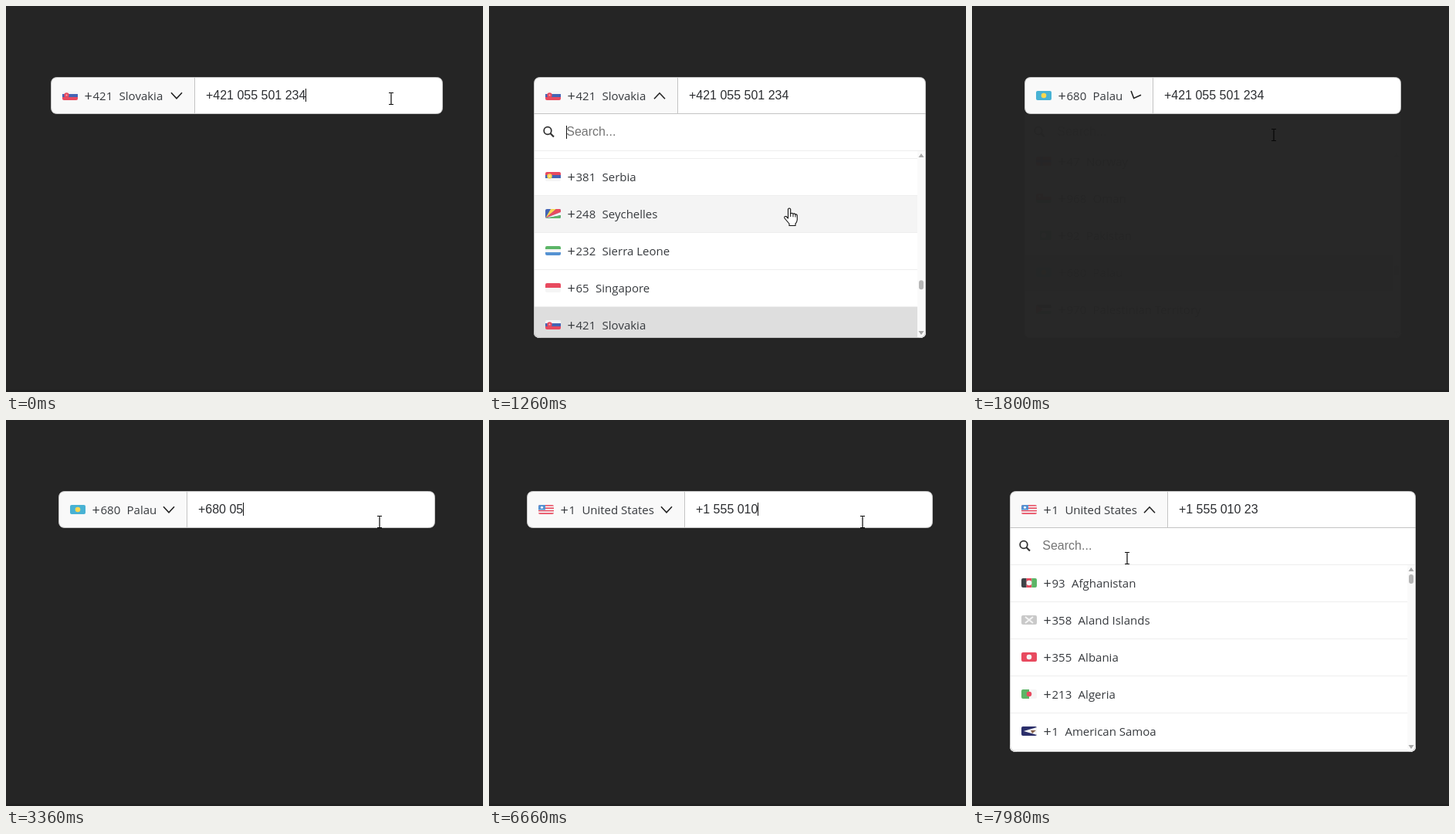
Animation, 618 px wide and 500 px high, one loop 8 s. Source, as an HTML page:

```html
<!DOCTYPE html>
<html lang="en">
<head>
<meta charset="utf-8">
<title>Phone input</title>
<style>
  html, body { margin: 0; width: 100%; height: 100%; overflow: hidden; background: #252525; }
  svg { display: block; width: 618px; height: 500px; }
  .label { font: 15px "Open Sans", "Noto Sans", sans-serif; fill: #373a3e; }
  .plus { font-size: 18px; }
  .input { font: 16px "Liberation Sans", Arial, sans-serif; fill: #2c2e31; }
</style>
</head>
<body>
<svg id="stage" viewBox="0 0 618 500"></svg>
<script>
const LOOP = 8000, STEP = 60, ROW = 48, TOP = 188, BOTTOM = 430, FLAG_H = 12;
const TOTAL_ROWS = 240, SECOND_BASE = 157;
const stage = document.getElementById('stage');

const palette = { r: '#e84a5f', w: '#f5f5f5', b: '#4464b4', g: '#5cb567', y: '#fbd850', c: '#48b2d4', d: '#5592d2',
                  k: '#3e4347', n: '#2b2f6b', o: '#f0924a', s: '#c9c9c9', m: '#8b3450' };

// Flag specs: stripe direction and colours, then emblems (+ canton, * disc, @ left disc, < or > wedge, x cross, / fan).
const parse = (text, base) => text.trim().split('\n').map((line, i) => {
  const [code, name, flag] = line.trim().split('|');
  return { code, name, flag, index: base + i };
});

const firstRows = parse(`93|Afghanistan|vkrg *w
  358|Aland Islands|hs xw
  355|Albania|hr *w
  213|Algeria|vgw *r
  1|American Samoa|hn >w
  376|Andorra|vbyr *o
  244|Angola|hrk *y
  1|Anguilla|hn +r
  1|Antigua and Barbuda|hkcr *y
  54|Argentina|hcwc *y`, 0);

const laterRows = parse(`47|Norway|hr xb
  968|Oman|hwrg +r
  92|Pakistan|vwggg *w
  680|Palau|hc *y
  970|Palestinian Territory|hkwg <r
  507|Panama|hwr +b
  675|Papua New Guinea|hrk *y
  595|Paraguay|hrwb *y
  51|Peru|vrwr
  63|Philippines|hbr <w
  48|Poland|hwr
  351|Portugal|vgrr @y
  1|Puerto Rico|hrwrwr <b
  974|Qatar|vwmm
  262|Reunion|vbwr
  40|Romania|vbyr
  7|Russia|hwbr
  250|Rwanda|hccyg
  685|Samoa|hr +b
  378|San Marino|hwc *y
  966|Saudi Arabia|hg *w
  221|Senegal|vgyr *g
  381|Serbia|hrbw @y
  248|Seychelles|hb /
  232|Sierra Leone|hgwd
  65|Singapore|hrw
  421|Slovakia|hwbr @r
  386|Slovenia|hwbr @b
  677|Solomon Islands|hbg
  252|Somalia|hc *w
  27|South Africa|hrgb <k`, SECOND_BASE);

const find = name => laterRows.find(r => r.name === name);
const slovakia = { ...find('Slovakia'), width: 186 };
const palau = { ...find('Palau'), width: 166 };
const unitedStates = { code: '1', name: 'United States', flag: 'hrwrwrwr +d', width: 204 };

const clamp = v => Math.max(0, Math.min(1, v));
const ramp = (t, a, b) => clamp((t - a) / (b - a));
const ease = p => p * p * (3 - 2 * p);

// Keys are [time, ...values].
function track(keys, t) {
  const i = keys.findIndex(k => k[0] > t);
  if (i < 1) return (i ? keys[keys.length - 1] : keys[0]).slice(1);
  const a = keys[i - 1], b = keys[i], p = ease(ramp(t, a[0], b[0]));
  return a.slice(1).map((v, n) => v + (b[n + 1] - v) * p);
}
const latest = (keys, t) => keys.filter(k => k[0] <= t).pop();

const mouseKeys = [[120, 499, 120], [480, 222, 122], [600, 222, 122], [960, 389, 262], [1260, 389, 262],
  [1500, 391, 310], [1620, 391, 345], [1800, 391, 167], [2340, 484, 132], [7260, 484, 132],
  [7500, 182, 138], [7600, 184, 142], [7980, 201, 179]];

const slovakiaTop = slovakia.index * ROW;
const scrollKeys = [[900, slovakiaTop], [1200, slovakiaTop - 4 * ROW - 10],
  [1260, slovakiaTop - 4 * ROW - 10], [1590, SECOND_BASE * ROW + 10]];
const lastScrollKeys = [[7500, 4 * ROW], [7800, 0]];

// [time, text, mode]: '|' caret, '' no caret, '#' selected
const typing = [
  [0, '+421 055 501 234', '|'], [540, '+421 055 501 234', ''], [2520, '+421 055 501 234', '|'],
  [2640, '+421 055 501 234', '#'], [2880, '+680', '|'], [3120, '+680 0', '|'],
  [3360, '+680 05', '|'], [3480, '+680 055', '|'], [3540, '+680 055 0', '|'],
  [3780, '+680 055 01', '|'], [3960, '+680 055 012', '|'], [4140, '+680 055 0123', '|'],
  [4380, '+680 055 0123', ''], [4560, '+680 055 0123', '#'], [4620, '+680', '|'],
  [4980, '+680', ''], [5160, '+680', '|'], [5220, '+68', '|'], [5280, '+6', '|'], [5340, '+', '|'],
  [5520, '+1', '|'], [5580, '+1 5', '|'], [5940, '+1 55', '|'], [6120, '+1 555', '|'],
  [6240, '+1 555 0', '|'], [6420, '+1 555 01', '|'], [6600, '+1 555 010', '|'],
  [6720, '+1 555 010 2', '|'], [6840, '+1 555 010 23', '|'], [7020, '+1 555 010 23', ''],
  [7140, '+1 555 010 23', '|'], [7440, '+1 555 010 23', '']];

const rect = (x, y, w, h, fill, more = '') =>
  `<rect x="${x}" y="${y}" width="${w}" height="${h}" fill="${fill}" ${more}/>`;
const path = (d, fill, more = '') => `<path d="${d}" fill="${fill}" ${more}/>`;
const text = (x, y, kind, s, more = '') => `<text x="${x}" y="${y}" class="${kind}" ${more}>${s}</text>`;

function rounded(x, y, w, h, top, bottom) {
  return `M${x + top} ${y}h${w - 2 * top}q${top} 0 ${top} ${top}v${h - top - bottom}` +
    `q0 ${bottom} ${-bottom} ${bottom}h${2 * bottom - w}q${-bottom} 0 ${-bottom} ${-bottom}` +
    `v${top + bottom - h}q0 ${-top} ${top} ${-top}z`;
}

function flag(spec, x, y) {
  const [base, ...emblems] = spec.split(' ');
  const stripes = [...base.slice(1)], n = stripes.length;
  let out = stripes.map((c, i) => base[0] === 'h'
    ? rect(0, i * FLAG_H / n, 20, FLAG_H / n, palette[c])
    : rect(i * 20 / n, 0, 20 / n, FLAG_H, palette[c])).join('');
  for (const [kind, key] of emblems) {
    const c = palette[key];
    if (kind === '+') out += rect(0, 0, 9, 6.5, c) + `<circle cx="4.5" cy="3.2" r="1.5" fill="#fff"/>`;
    if (kind === '*') out += `<circle cx="10" cy="6" r="3.3" fill="${c}"/>`;
    if (kind === '@') out += `<circle cx="5.5" cy="5.5" r="3.2" fill="${c}"/>` +
      `<circle cx="5.5" cy="5.5" r="1" fill="#fff" opacity=".6"/>`;
    if (kind === '<') out += path('M0 0L9 6L0 12z', c);
    if (kind === '>') out += path('M20 1L3 6L20 11z', c) + path('M12 5l7 0l-5 4z', '#85604a');
    if (kind === 'x') out += key === 'w' ? path('M5 2L15 10M15 2L5 10', 'none', `stroke="${c}" stroke-width="2"`)
      : path('M0 6H20M7 0V12', 'none', `stroke="${c}" stroke-width="3"`);
    if (kind === '/') out += path('M0 12L7 0H14z', palette.y) + path('M0 12L14 0H20V4z', palette.r) +
      path('M0 12L20 4V8z', palette.w) + path('M0 12L20 8V12z', palette.g);
  }
  return `<g transform="translate(${x} ${y})" clip-path="url(#flagClip)">${out}</g>`;
}

function country(c, x, mid) {
  const y = mid + 5, digits = x + 39.5;
  return flag(c.flag, x, mid - 7) + text(x + 28.5, y + 1, 'label plus', '+') + text(digits, y, 'label', c.code) +
    text(digits + c.code.length * 8.6 + 8.3, y, 'label', c.name);
}

// Liberation Sans advances at 16px
const inputWidth = s => [...s].reduce((w, ch) => w + (ch === '+' ? 9.34 : ch === ' ' ? 4.45 : 8.9), 0);
const caret = (x, y) => rect(Math.floor(x), y, 1, 17, '#111');

function header(x, w, chosen, hover, open, turn, entry) {
  const split = x + chosen.width, textX = split + 14.9, textW = inputWidth(entry[1]);
  const selected = entry[2] === '#', bottom = open ? 0 : 8;
  const shape = rounded(x + .5, 92.5, w - 1, 47, 8, bottom);
  return path(shape, '#fff') +
    `<clipPath id="headClip">${path(shape, '#fff')}</clipPath>` +
    rect(x, 92, chosen.width, 48, hover ? '#e6e6e6' : '#f9f9f9', 'clip-path="url(#headClip)"') +
    rect(split, 93, 1, 46, '#c4c4c4') +
    path(shape, 'none', 'stroke="#c4c4c4"') +
    country(chosen, x + 15, 117) +
    path('M-7 -4L0 3.5L7 -4', 'none', `stroke="#222" stroke-width="1.6"
      transform="translate(${split - 23} 116.3) rotate(${turn * 180})"`) +
    (selected ? rect(textX, 106, textW, 19, '#0078d7') : '') +
    text(textX, 121, 'input', entry[1], selected ? 'style="fill:#fff"' : '') +
    (entry[2] === '|' ? caret(textX + textW, 107) : '');
}

function panel(x, w, rows, chosen, scroll, mouseY, opacity, showCaret) {
  const right = x + w, shape = rounded(x, 140, w, 290, 0, 8);
  const thumb = 200 + scroll / (TOTAL_ROWS * ROW - 242) * 204;
  const list = rows.map(r => {
    const y = TOP + r.index * ROW - scroll;
    if (y + ROW < TOP || y > BOTTOM) return '';
    const hover = mouseY > TOP && mouseY >= y && mouseY < y + ROW;
    const fill = r.name === chosen.name ? '#dedede' : hover ? '#f4f4f4' : '#fff';
    return rect(x, y, w, ROW, fill) + rect(x, y + ROW - 1, w, 1, '#eee') + country(r, x + 15, y + 24);
  }).join('');
  return `<g opacity="${opacity}"><clipPath id="panelClip">${path(shape, '#fff')}</clipPath>
    <clipPath id="listClip">${rect(x, TOP, w, BOTTOM - TOP, '#fff')}</clipPath>
    ${path(shape, '#fff')}
    <g clip-path="url(#panelClip)">
      <circle cx="${x + 18}" cy="161.5" r="4.8" fill="none" stroke="#333" stroke-width="1.8"/>
      ${path(`M${x + 21.5} 165L${x + 26} 169.5`, 'none', 'stroke="#333" stroke-width="2.2"')}
      ${text(x + 42.3, 168, 'input', 'Search...', 'style="fill:#757575"')}
      ${showCaret ? caret(x + 42, 155) : ''}
      <g clip-path="url(#listClip)">${list}</g>
      ${rect(x, 187, w, 1, '#eee')}
      ${rect(right - 11, TOP, 11, 242, '#fafafa')}
      ${path(`M${right - 9.5} 196l3.5 -5l3.5 5zM${right - 9.5} 421l3.5 5l3.5 -5z`, '#a8a8a8')}
      ${rect(right - 9, thumb, 6, 12, '#b5b5b5', 'rx="3"')}
      ${path(rounded(x + .5, 139.5, w - 1, 290, 0, 8), 'none', 'stroke="#c4c4c4"')}
    </g></g>`;
}

function pointer(x, y, hand) {
  if (!hand) return path(`M${x - 3} ${y - 7.5}h2.5l.5 .5l.5 -.5h2.5M${x} ${y - 7}v14M${x - 3} ${y + 7.5}h2.5l.5 -.5l.5 .5h2.5`,
    'none', 'stroke="#080808" stroke-width="1.2"');
  return path('M-1.5 1Q0 -1 1.7 1V7Q3.5 5.5 5 7.3Q6.7 6.3 8 8Q10 7.3 10.3 9.5V15Q10 18 8 20V22.5H0V20L-6 13Q-7 10 -4 10.5L-1.5 13z',
    '#fff', `stroke="#111" stroke-width="1.1" stroke-linejoin="round" transform="translate(${x} ${y})"`) +
    path(`M${x + 1.7} ${y + 7}v4M${x + 5} ${y + 7.3}v4M${x + 8} ${y + 8}v3.5`, 'none', 'stroke="#111"');
}

// How far a part is shown: two opening fades and one closing fade.
function shown(t, closeStart, closeEnd) {
  if (t >= 7470) return ramp(t, 7472, 7672);
  return Math.min(ramp(t, 510, 710), 1 - ramp(t, closeStart, closeEnd));
}

function render(time) {
  const t = Math.floor(time / STEP) * STEP, late = t >= 7470;
  const chosen = t < 1620 ? slovakia : t < 5520 ? palau : unitedStates;
  const w = chosen.width + 322, x = (624 - w) / 2;
  const open = (t >= 540 && t < 1620) || late;
  const opacity = shown(t, 1600, 1802), turn = shown(t, 1625, 1825);
  const [mx, my] = track(mouseKeys, t);
  const overLabel = mx > x && mx < x + chosen.width && my > 92 && my <= 140;
  const [scroll] = track(late ? lastScrollKeys : scrollKeys, t);
  const searchCaret = late ? t < 7900 : t < 1620;

  stage.innerHTML = `<defs><clipPath id="flagClip">${rect(0, 0, 20, FLAG_H, '#fff', 'rx="2"')}</clipPath></defs>` +
    rect(0, 0, 618, 500, '#252525') + rect(0, 497, 618, 3, '#202020') +
    (opacity > 0 ? panel(x, w, late ? firstRows : laterRows, chosen, scroll, open ? my : 0, opacity, searchCaret) : '') +
    header(x, w, chosen, overLabel, open, turn, latest(typing, t)) +
    pointer(mx, my, overLabel || (open && my > TOP));
}

const start = performance.now();
function tick() {
  render((performance.now() - start) % LOOP);
  requestAnimationFrame(tick);
}
tick();
</script>
</body>
</html>
```
